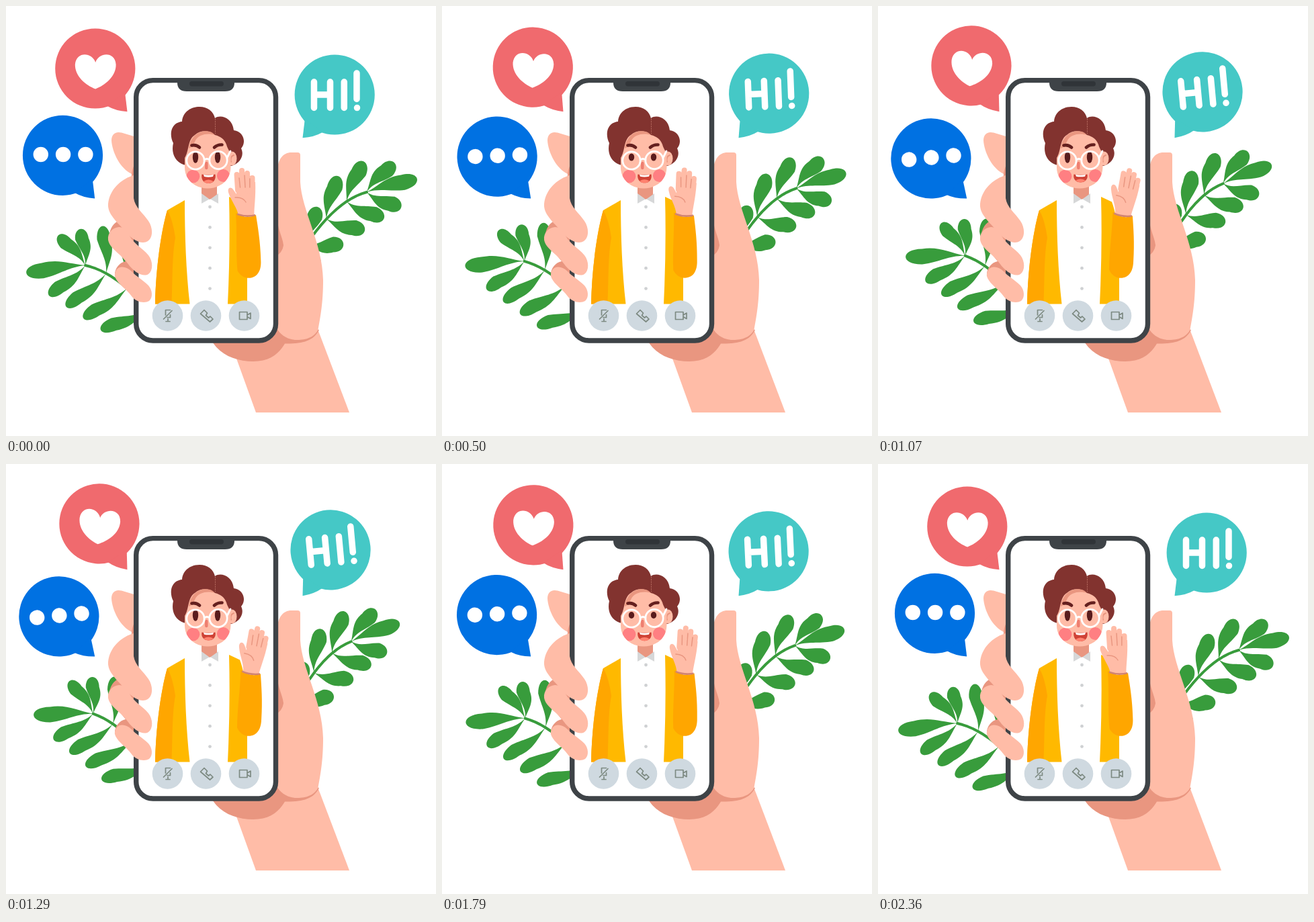
An HTML page for the animation above (2430 ms loop, 640 by 640 pixels).

```html
<!DOCTYPE html>
<html lang="en">
<head>
<meta charset="utf-8">
<title>Video call</title>
<style>
html, body { margin: 0; width: 100%; height: 100%; overflow: hidden; background: #fff; }
svg { display: block; width: 100%; height: 100%; }
.skin { fill: #ffbca7; }
.shade { fill: #e99680; }
.line { fill: none; stroke-linecap: round; stroke-linejoin: round; }
</style>
</head>
<body>
<svg viewBox="0 0 640 640">
  <defs>
    <g id="bubble">
      <circle cx="132.8" cy="93" r="59.6"/>
      <path d="M151 149Q163 156 180.5 157.3L177 128Z"/>
    </g>
    <clipPath id="faceClip"><use href="#face"/></clipPath>
  </defs>

  <!-- speech bubbles -->
  <g id="heart">
    <use href="#bubble" fill="#f06a6e"/>
    <path fill="#fff" d="M133.2 84C138 69 162 67 163.6 87C164 105 147 118 133.2 123.5C119 118 102.5 105 102.8 87C105 67 128 69 133.2 84Z"/>
  </g>
  <g id="dots" fill="#fff"><use href="#bubble" x="-48.3" y="129.3" fill="#0071e2"/></g>
  <g id="hi">
    <use href="#bubble" transform="translate(622 39) scale(-1 1)" fill="#45c8c6"/>
    <path class="line" stroke="#fff" stroke-width="9.5" d="M458.5 113V151.5M482.5 113V151.5M458.5 132H482.5M503.3 113V151.5M522 100V138.5M522.5 151.5v.1"/>
  </g>

  <!-- foliage -->
  <g id="leftPlant" fill="#389c3c"></g>
  <g id="rightPlant" fill="#389c3c"></g>

  <!-- hand behind the phone -->
  <path class="skin" d="M342 522L372 605H511L464 481L400 488Z"/>
  <path class="shade" d="M306 498C318 519 342 529 368 529C392 529 406 518 415 502.500C440 503 458 499 466 482L404 470Z"/>
  <path class="skin" d="M403 250C404 228 412 218 425 218H434Q438 218 438 222V262C440 304 471 352 472 408C472 442 468 462 464.5 482C456 497 440 497 430 497C415 495 408 488 403 480Z"/>
  <path class="shade" d="M403 315C406 337 412 345 413 356C412 364 407 369 403 372Z"/>
  <path class="skin" d="M192 194.5L172 188.5C162 186 157 192 157 200C158 218 170 242 187 250H192Z"/>
  <path class="shade" d="M192 234Q186 246 187 256H192ZM172 318C158 322 152 335 154 350L178 380C168 382 161 392 162 402L192 425V318Z"/>

  <!-- phone -->
  <rect x="193.7" y="110.6" width="207.8" height="387.4" rx="25" fill="#fff" stroke="#3e4347" stroke-width="7.4"/>
  <path fill="#3e4347" d="M255 111V114Q255 127 269 127H326Q340 127 340 114V111Z"/>
  <rect x="273" y="112" width="51" height="7.5" rx="3.7" fill="#303438"/>

  <!-- caller: body -->
  <path class="shade" d="M291 262H314V283L303 288L291 283Z"/>
  <path fill="#d6d7d8" d="M291 279V294L303.5 287L316 294V279L303.5 288Z"/>
  <g id="buttons" fill="#cfd1d3"></g>
  <path fill="#ffb900" d="M266 289L240 304C231 335 223 390 222 443.5H273.5C268 395 266 340 266 289ZM332 284L348 291.500C353 305 357 325 359 350V443.5H330Q334 360 332 284Z"/>
  <path fill="#ffa600" d="M240 304C231 335 223 390 222 443.5H246.5C248 410 247 372 252 345Q248 317 240 304Z"/>

  <!-- waving arm -->
  <g id="arm">
    <g id="hand">
      <path class="skin" d="M346 312C344 300 335 290 331.5 279C328.5 271 334 268 338 273L343 280L341 262H371C372 285 369 300 369.5 312Z"/>
      <path class="line" stroke="#ffbca7" stroke-width="8" d="M343.5 251L345 274M351 245V272M359 249L360 275M366.5 256V280"/>
      <path class="line" stroke="#e99680" stroke-width="1.5" d="M347 256L348.5 270M355 252L356 270M362.8 257V270M341 285Q353 284 357 292"/>
    </g>
    <path fill="#ffa600" d="M342 308C344 335 342 365 344.5 394C350 404 361 408 371 402C378 397 380 388 379.3 378C378.5 350 375 330 372 311Q357 318 342 308Z"/>
    <path fill="#d08473" d="M344 308.500Q357 313 371 310V312.500Q356 316 344 311Z"/>
  </g>

  <!-- caller: head -->
  <path fill="#82332f" d="M268 237C254 235 245 221 249 204C243 193 244 174 262 172C263 157 276 150 288 150C300 150 309 157 311 167C319 161 337 166 339 185C354 187 358 203 350 212C355 222 349 234 336 238Z"/>
  <ellipse class="skin" cx="336.500" cy="227" rx="7" ry="10.5"/>
  <path class="line" stroke="#e99680" stroke-width="2" d="M339 222Q333 224 335 232"/>
  <path id="face" class="skin" d="M266 226C273 215 270 199 281 192C291 184 302 185 311 192C319 194 325 198 328 206C330 214 334 216 334.5 224V240C334 261 317 271.5 300 271.5C283 271.5 266 260 266 240Z"/>
  <path class="shade" d="M272 212C274 199 281 188 296 186C306 186 309 190 311 192C302 189 286 190 281 202Q278 210 272 212Z"/>
  <path class="line" stroke="#b3675c" stroke-dasharray="1.5 2" d="M311.5 168V190"/>
  <g clip-path="url(#faceClip)" fill="#ff7f82"><circle cx="278.5" cy="253.5" r="9.8"/><circle cx="323.5" cy="252.5" r="9.5"/></g>
  <path class="line" stroke="#65201f" stroke-width="4.6" d="M276.5 207.5Q283 206 288 210.5M310 210.5Q315 206 321.5 206.5"/>
  <g fill="#591c1d"><ellipse id="eyeL" cx="282" cy="225" rx="4.2"/><ellipse id="eyeR" cx="315" cy="225" rx="4.2"/></g>
  <path class="line" stroke="#ee7e70" stroke-width="4.5" d="M298.3 234V241"/>
  <g class="line" stroke="#fff" stroke-width="2.8"><circle cx="282" cy="230" r="13.2"/><circle cx="316" cy="229.5" r="13.2"/><path d="M295 229Q299 226 303 229M329 226L334 216"/></g>
  <g id="mouth">
    <path fill="#cf4236" d="M291.5 250.5Q301 252.5 311.5 250.5C313 259 308 264 301.5 264C295 264 290 259 291.5 250.5Z"/>
    <path fill="#fff" d="M294 251Q301 252.5 309 251L308 254Q301 255.5 295 254Z"/>
    <path fill="#ff826f" d="M294 261Q301 256 309 261Q305 264 301.5 264Q297 264 294 261Z"/>
  </g>

  <!-- call controls -->
  <g id="controls" fill="#cfd9e0"></g>
  <g class="line" stroke="#7d8a82" stroke-width="1.7">
    <path d="M237.500 460V452.5H244.5M244.5 459.5V463.5H240M241 465.5V469.5M238 469.5H244M247 453.5L234.5 466"/>
    <path d="M289.5 458L295 452.5L299.5 457L297.5 460.5L301.5 464L304 462L308 466L303.5 470Z"/>
    <path d="M347.5 455.5H359V466.5H347.5ZM359 460L364 457V465.5L359 462.5"/>
  </g>

  <!-- fingers over the phone -->
  <path class="skin" d="M190 252C172 257 152 274 152 298C153 312 168 324 180 338C190 350 203 355 211 350C219 345 219 330 212 320C204 308 192 300 190 286Z"/>
  <path class="skin" d="M168 329C158 330 151 338 152 348C154 361 170 368 181 383C190 396 204 404 212 399C219 394 219 380 212 371C203 360 190 354 184 342C180 333 175 329 168 329Z"/>
  <path class="skin" d="M172 388.5C164 389 160 398 163 405C168 415 179 421 187 432C194 441 206 443 213 439C219 434 218 423 212 416C203 407 193 402 187 395Q180 388 172 388.5Z"/>
</svg>

<script>
const LOOP = 2430, STEPS = 34;
const $ = id => document.getElementById(id);
const add = (id, tag, attrs) => {
  const el = document.createElementNS('http://www.w3.org/2000/svg', tag);
  for (const k in attrs) el.setAttribute(k, attrs[k]);
  $(id).append(el);
};

// Evenly spaced row of equal circles.
function circles(id, count, cx, cy, dx, dy, r) {
  for (let i = 0; i < count; i++) add(id, 'circle', { cx: cx + i * dx, cy: cy + i * dy, r });
}
circles('dots', 3, 51.8, 221, 33.3, 0, 11.2);
circles('buttons', 5, 303.5, 299, 0, 30.4, 2.4);
circles('controls', 3, 240.5, 461, 57, 0, 22.8);

// Teardrop from base to tip, w wide, bowed sideways by bend.
function leaf(id, [x, y], [tx, ty], w, bend) {
  const len = Math.hypot(tx - x, ty - y), h = w / 2;
  const angle = Math.atan2(ty - y, tx - x) * 180 / Math.PI;
  const a = len * .28, b = len * .42, c = len * .72, d = len * 1.09;
  add(id, 'path', {
    d: `M0 0C${a} ${bend - h * .2} ${b} ${bend - h} ${c} ${-h}` +
       `C${d} ${-h} ${d} ${h} ${c} ${h}C${b} ${bend + h} ${a} ${bend + h * .2} 0 0Z`,
    transform: `translate(${x} ${y}) rotate(${angle})`
  });
}

// Point i on a parabola: start, velocity, acceleration.
const arc = (x, y, vx, vy, ax, ay) => i => [x + vx * i + ax * i * i, y + vy * i + ay * i * i];

// One end leaf, then leaves above and below a curved stem.
function plant(id, side, w, end, stem, upper, lower, skip) {
  const points = Array.from({ length: 14 }, (_, i) => stem(i / 4));
  add(id, 'polyline', { points: points.join(' '), class: 'line', stroke: '#389c3c', 'stroke-width': 4 });
  leaf(id, stem(0), end, 23, side * 3);
  for (let i = 0; i < 4; i++) leaf(id, stem(Math.max(0, i - skip)), upper(i), w, side * 5);
  for (let i = 0; i < 4 + (1 - skip); i++) leaf(id, stem(i), lower(i), w, side * -5);
}
plant('leftPlant', 1, 20, [30, 397], arc(118, 386, 31, 7, 0, 5),
  arc(78, 341, 33, -12, 0, 2.6), arc(64, 431, 25.6, 17, 0, 0), 1);
plant('rightPlant', -1, 23, [612, 257], arc(537, 277, -30, 8, 0, 6),
  arc(578, 233, -50, -14, 4, 12), arc(588, 301, -24, 15, -1.5, 1), 0);

// Swinging parts: full angle and pivot.
const swings = {
  heart: [5.4, 180.5, 157],
  dots: [-5.3, 132, 286.5],
  hi: [-5.4, 441.5, 196.5],
  leftPlant: [6.2, 258, 488],
  rightPlant: [-6.6, 413, 477],
  arm: [5.3, 361, 388],
  hand: [9, 358, 311]
};

function draw(time) {
  const step = Math.floor((time % LOOP + 5) * STEPS / LOOP) % STEPS;
  const swing = (1 - Math.cos(2 * Math.PI * (step + .5) / STEPS)) / 2;
  for (const id in swings) {
    const [angle, x, y] = swings[id];
    $(id).setAttribute('transform', `rotate(${angle * swing} ${x} ${y})`);
  }
  const half = Math.min(step, STEPS - 1 - step);
  const blink = Math.max(0, 1 - Math.abs(half - 7.7) / 3);
  for (const id of ['eyeL', 'eyeR']) $(id).setAttribute('ry', 8.8 - 4.2 * blink);
  $('mouth').setAttribute('transform', `translate(0 251) scale(1 ${1 - .12 * swing}) translate(0 -251)`);
}

const start = performance.now();
function tick() {
  draw(performance.now() - start);
  requestAnimationFrame(tick);
}
tick();
</script>
</body>
</html>
```
